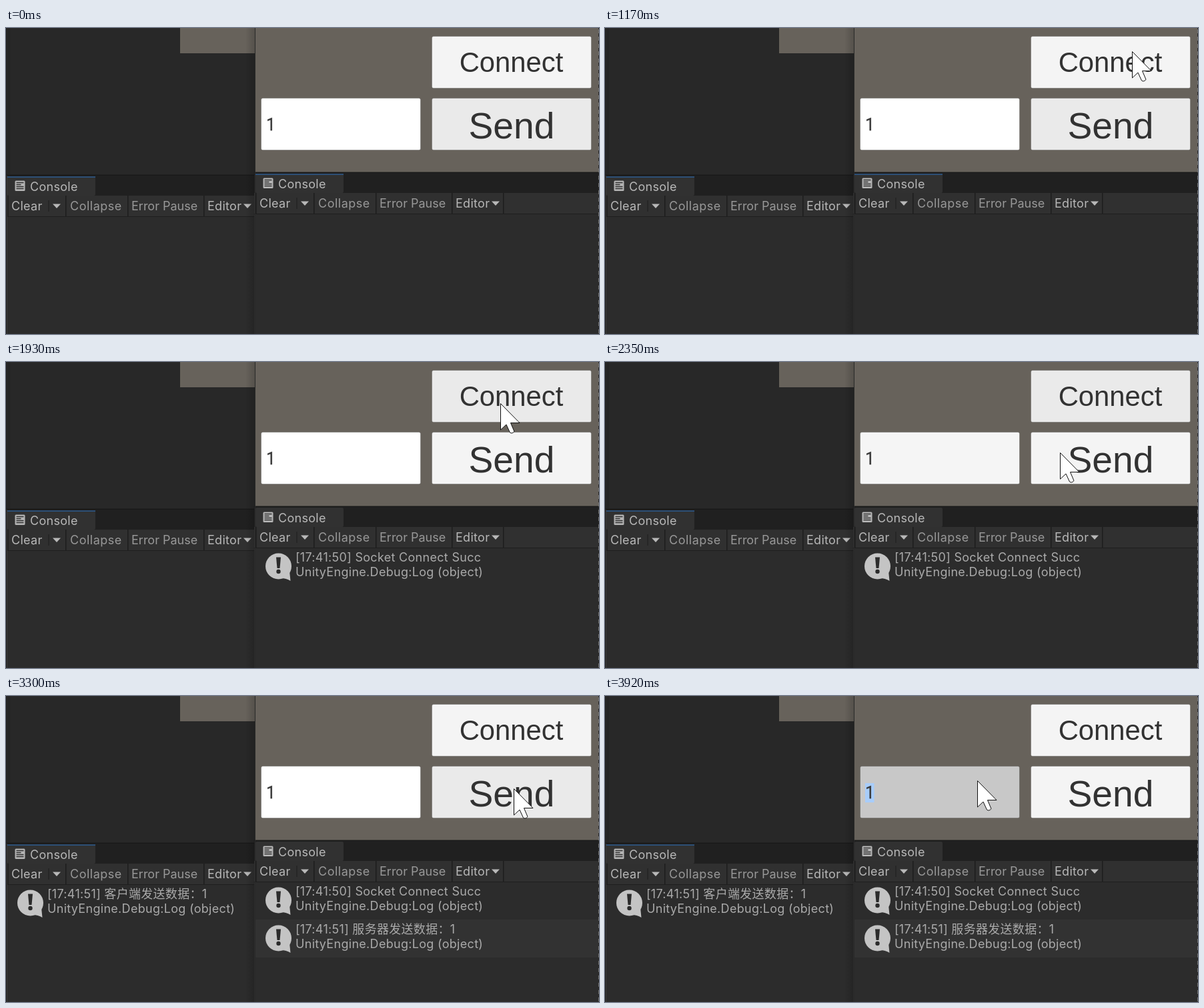
An HTML page for the animation above (3.96 s loop, 889 px wide and 460 px high).

```html
<!DOCTYPE html>
<html lang="zh-CN">
<head>
<meta charset="utf-8">
<title>Console demo</title>
<style>
html, body { margin: 0; width: 100%; height: 100%; overflow: hidden; background: #2c2c2c; }
svg { display: block; }
text { white-space: pre; }
.ui { font: 18px Inter, "Noto Sans CJK SC", "Noto Sans CJK", sans-serif; font-optical-sizing: none; font-feature-settings: "calt" 0; letter-spacing: .3px; fill: #b8b8b8; }
.dim { fill: #989898; letter-spacing: .5px; }
.tight { letter-spacing: 0; }
.log { fill: #aaa; }
.label { font-family: "Liberation Sans", Arial, sans-serif; fill: #323232; text-anchor: middle; }
.field { font: 25px Roboto, sans-serif; fill: #3a3a3a; stroke: #3a3a3a; stroke-width: .3; }
.button { stroke: #000; stroke-opacity: .2; }
</style>
</head>
<body>
<svg id="stage" width="889" height="460" viewBox="0 0 889 460"></svg>
<script>
const LOOP = 3960, STEP = 20, FADE = 100;

const rect = (x, y, w, h, fill, extra = '') =>
  `<rect x="${x}" y="${y}" width="${w}" height="${h}" fill="${fill}" ${extra}/>`;
const text = (x, y, s, cls, extra = '') =>
  `<text x="${x}" y="${y}" class="${cls}" ${extra}>${s}</text>`;
const arrow = x => `<path d="M${x - 6} 264.5h12l-6 6.5z" fill="#b8b8b8"/>`;
const button = (id, x, y) =>
  rect(x + .5, y + .5, 239, 78, '#f4f4f4', `id="${id}" rx="2.5" class="button"`);

// One log entry: speech bubble and two lines of text
const entry = (id, y, message, back = '') => `<g id="${id}" transform="translate(0 ${y})">
  ${back}
  <circle cx="36.5" cy="28" r="19.5" fill="#c4c4c4"/>
  <path d="M40 46Q48 46 54.5 50L53 35z" fill="#c4c4c4"/>
  <path d="M33 14.5h7L38.5 31h-4z" fill="#2b2b2b"/><circle cx="36.5" cy="36" r="3.2" fill="#2b2b2b"/>
  ${text(62, 21, message, 'ui log')}
  ${text(62, 43, 'UnityEngine.Debug:Log (object)', 'ui log')}</g>`;

const consolePane = (id, width, entries) => `
  ${rect(0, 220.5, width, 2, '#191919')}
  ${rect(0, 222.5, width, 30, '#202020')}
  ${rect(2, 223, 132, 29, '#313131', 'rx="2"')}
  ${rect(2, 223, 132, 2, '#2c4f76', `id="${id}"`)}
  ${rect(13.5, 229.5, 15, 15.5, '#b4b4b4', 'rx="1.5"')}
  <path d="M15.5 232.5h11m-11 3h7m-7 3h11m-11 3h11" stroke="#313131" stroke-width="1.5"/>
  ${text(36, 245, 'Console', 'ui')}
  ${rect(0, 252, width, 31, '#303030')}
  ${[3, 90, 183, 297, 374].map(x => rect(x - 1, 252, 1.5, 31, '#1d1d1d')).join('')}
  ${rect(63.5, 259, 1, 17, '#1d1d1d')}
  ${text(8, 274, 'Clear', 'ui')}${arrow(76)}
  ${text(96, 274, 'Collapse', 'ui dim')}
  ${text(188, 274, 'Error Pause', 'ui dim tight')}
  ${text(302, 274, 'Editor', 'ui')}${arrow(362)}
  ${rect(0, 283, width, 181, '#2c2c2c')}
  ${rect(0, 283, width, 1, '#1f1f1f')}
  ${entries}`;

const stage = document.getElementById('stage');
stage.innerHTML = `
  <defs>
    <linearGradient id="shade"><stop stop-opacity="0"/><stop offset="1" stop-opacity=".18"/></linearGradient>
    <clipPath id="left"><rect width="373" height="460"/></clipPath>
  </defs>
  <g clip-path="url(#left)">
    ${rect(0, 0, 373, 221, '#282828')}
    ${rect(2, 0, 4.5, 220, '#242424')}
    ${rect(261, 0, 113, 38, '#67625b')}
    ${consolePane('leftFocus', 373, entry('leftLog', 283, '[17:41:51] 客户端发送数据：1'))}
    ${rect(0, 0, 1, 460, '#1c1c1c')}
    ${rect(1, 222, 1, 238, '#3a3a3a')}
    ${rect(359, 0, 14, 460, 'url(#shade)')}
  </g>
  ${rect(373, 0, 516, 217, '#67625b')}
  <g transform="translate(372 -4)">
    ${consolePane('rightFocus', 517,
      entry('connectLog', 283, '[17:41:50] Socket Connect Succ') +
      entry('replyLog', 340, '[17:41:51] 服务器发送数据：1', rect(2, 0, 515, 57, '#323232')))}
  </g>
  ${rect(373, 0, 1, 460, '#2a2a2a')}
  <path d="M888.5 0V460" stroke="#262626"/>
  <path d="M888.5 2V460" stroke="#6c6c6c" stroke-dasharray="6 5"/>
  ${button('connect', 638, 12)}
  ${button('send', 638, 105)}
  ${button('field', 382, 105)}
  ${rect(390, 131, 13.5, 29, '#a8cdfa', 'id="mark"')}
  ${text(757.5, 66, 'Connect', 'label', 'font-size="41.8"')}
  ${text(758, 165.5, 'Send', 'label', 'font-size="55.2"')}
  ${text(390, 154, '1', 'field')}
  <path id="cursor" d="M0 0V39.5L8.500 31.5 14 43.5Q17 46 20.5 42L15 29H28.5z" fill="#fff" stroke="#111" stroke-linejoin="round"/>`;

const el = id => document.getElementById(id);

// Key poses of the cursor: [ms, x, y]
const path = [
  [600, 745, 455], [650, 825, 312], [770, 860, 90], [990, 790, 35],
  [1710, 790, 35], [1930, 737, 64], [2250, 554, 136],
  [2350, 692, 136], [2520, 775, 46], [2750, 762, 139],
  [3280, 762, 139], [3520, 660, 149], [3690, 389, 116], [3800, 558, 127]
];

// Control states: each change fades in from the one before
const tones = { idle: 244, selected: 234, pressed: 191, blank: 255, hover: 245, held: 200 };
const states = {
  connect: [[0, 'idle'], [1170, 'pressed'], [1300, 'selected'], [2780, 'idle']],
  send: [[0, 'selected'], [1170, 'idle'], [2340, 'selected'], [2805, 'pressed'],
         [2920, 'selected'], [3820, 'idle']],
  field: [[0, 'blank'], [2190, 'hover'], [2350, 'blank'], [3560, 'hover'], [3820, 'held']]
};

// Moments at which parts appear
const shown = { cursor: 610, connectLog: 1420, leftLog: 2960, replyLog: 3040, mark: 3840 };
const focusLost = 1180;

function tone([first, ...changes], t) {
  return changes.reduce((v, [at, state]) => {
    const u = Math.min(1, Math.max(0, (t - at) / FADE));
    return v + (tones[state] - v) * u;
  }, tones[first[1]]);
}

// Tangent through a key pose; zero where the motion rests or turns back
function slope(i, axis) {
  const a = path[i - 1], p = path[i], b = path[i + 1];
  if (!a) return (b[axis] - p[axis]) / (b[0] - p[0]);
  if (!b || (p[axis] - a[axis]) * (b[axis] - p[axis]) <= 0) return 0;
  return (b[axis] - a[axis]) / (b[0] - a[0]);
}

function cursorAt(t) {
  const i = path.findIndex(p => p[0] > t);
  if (i < 1) return (i ? path[path.length - 1] : path[0]).slice(1);
  const a = path[i - 1], b = path[i], d = b[0] - a[0], u = (t - a[0]) / d, v = 1 - u;
  return [1, 2].map(k =>
    a[k] * (1 + 2 * u) * v * v + b[k] * u * u * (3 - 2 * u) +
    d * u * v * (slope(i - 1, k) * v - slope(i, k) * u));
}

function show(id, on) {
  el(id).style.display = on ? '' : 'none';
}

function draw(t) {
  for (const id in shown) show(id, t >= shown[id]);
  show('rightFocus', t < focusLost);
  for (const id in states) {
    const v = Math.round(tone(states[id], t));
    el(id).setAttribute('fill', `rgb(${v},${v},${v})`);
  }
  const [x, y] = cursorAt(t).map(c => Math.round(c) + .5);
  el('cursor').setAttribute('transform', `translate(${x} ${y})`);
}

const start = performance.now();
function tick() {
  const t = (performance.now() - start) % LOOP;
  draw(Math.floor(t / STEP) * STEP);
  requestAnimationFrame(tick);
}
draw(0);
requestAnimationFrame(tick);
</script>
</body>
</html>
```
